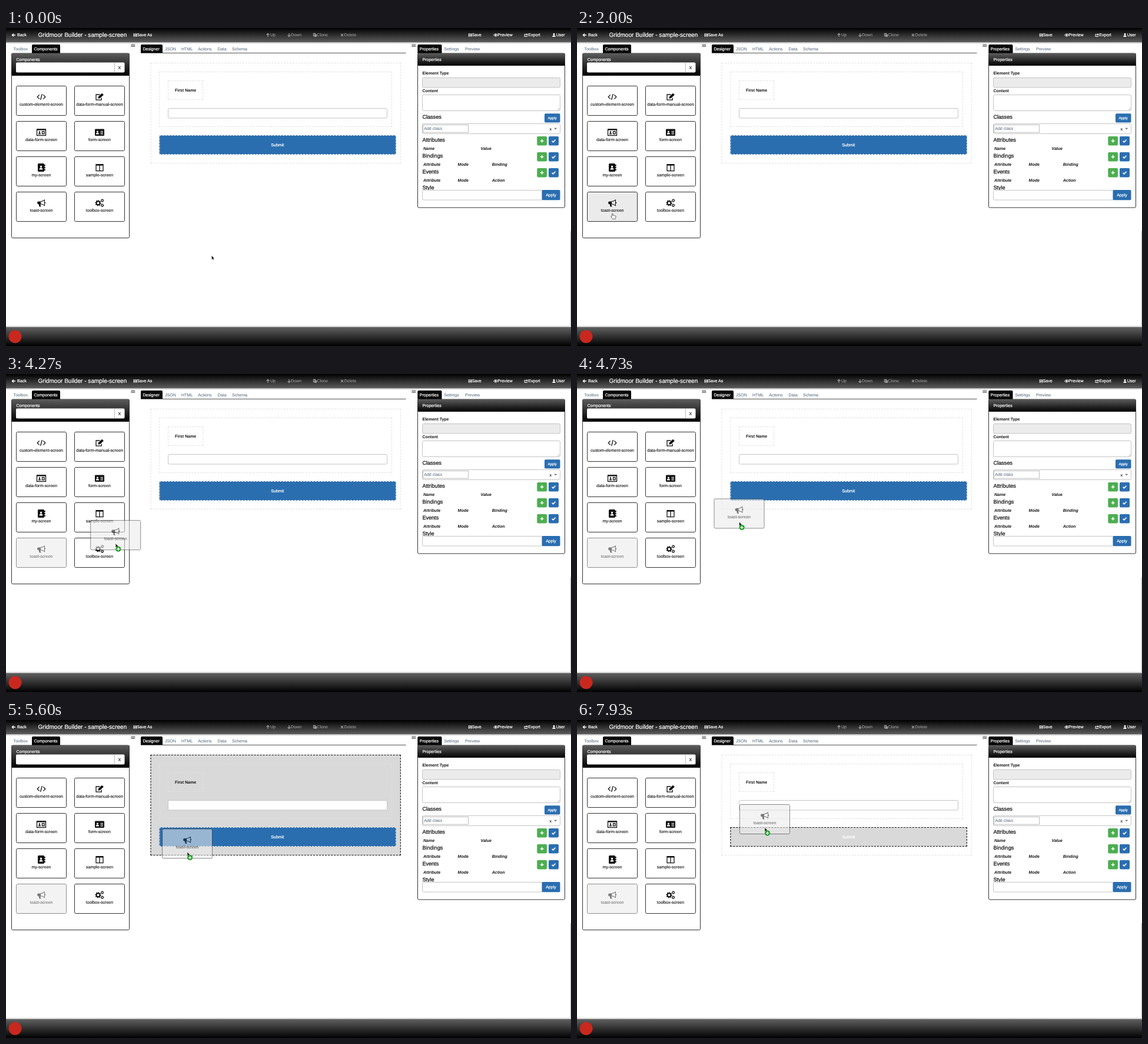
An HTML page for the animation above (8000 ms loop, 960 by 540 pixels).

```html
<!DOCTYPE html>
<html lang="en">
<head>
<meta charset="utf-8">
<title>Screen designer</title>
<style>
  html, body { margin: 0; width: 100%; height: 100%; overflow: hidden; background: #fff; }
  svg { display: block; width: 100%; height: 100%; }
  text { font: 7.1px "Liberation Sans", Arial, sans-serif; text-rendering: geometricPrecision; fill: #111; stroke: #111; stroke-width: .12; }
  .white { fill: #fff; stroke: #fff; stroke-width: .22; }
  .grey { fill: #999; stroke: #999; }
  .tab { fill: #4a6076; stroke: none; }
  .bold { font-weight: bold; font-size: 7px; stroke: none; }
  .col { font-weight: bold; font-style: italic; font-size: 7px; stroke: none; }
  .head { font-size: 9.1px; stroke-width: .25; }
  .title { font-size: 10.05px; }
  .mid { text-anchor: middle; }
  .dashed { fill: none; stroke: #e0e0e0; }
  .dashed rect { stroke: none; }
  .over { fill: #d9d9d9; stroke: #000; }
  .card { fill: #fff; stroke: #333; }
  .hover .card { fill: #ebebeb; }
  .line { fill: none; stroke: currentColor; stroke-width: 1.3; }
  .cut { fill: #fff; }
</style>
</head>
<body>
<svg id="stage" viewBox="0 0 960 540"></svg>
<script>
const BLUE = '#2a6eb0', GREEN = '#4cae4f';

const text = (x, y, s, cls = '') => `<text x="${x}" y="${y}" class="${cls}">${s}</text>`;
const box = (x, y, x2, y2, attrs = '') =>
  `<rect x="${x}" y="${y}" width="${x2 - x}" height="${y2 - y}" ${attrs}/>`;
const field = (x, y, x2, y2, fill = '#fff') => box(x, y, x2, y2, `rx="2" fill="${fill}" stroke="#c4c4c4"`);
const at = (x, y, content, color = '#111') =>
  `<g transform="translate(${x} ${y})" color="${color}" fill="${color}">${content}</g>`;
const path = (d, attrs = '') => `<path d="${d}" ${attrs}/>`;
const gradient = (id, from, to) => `<linearGradient id="${id}" x2="0" y2="1">
  <stop stop-color="${from}"/><stop offset="1" stop-color="${to}"/></linearGradient>`;

// CSS-like dashed border: every side starts and ends with a whole dash
function dashed(x, y, x2, y2, id = '') {
  const dash = 3, gap = 2;
  const side = (d, length) => {
    const count = Math.round((length + gap) / (dash + gap));
    return path(d, `stroke-dasharray="${dash} ${(length - count * dash) / (count - 1)}"`);
  };
  const w = x2 - x, h = y2 - y;
  return `<g id="${id}" class="dashed">` + box(x, y, x2, y2) +
    side(`M${x} ${y + .5}h${w}`, w) + side(`M${x} ${y2 - .5}h${w}`, w) +
    side(`M${x + .5} ${y}v${h}`, h) + side(`M${x2 - .5} ${y}v${h}`, h) + '</g>';
}

const person = 'M-1.5-1.6a1.5 1.6 0 1 0 3 0a1.5 1.6 0 1 0-3 0M-2.6 3Q-2.6.2 0 .2T2.6 3Z';
const gear = (x, y, r) => `<g transform="translate(${x} ${y})" fill="none" stroke="currentColor">
  <circle r="${r}" stroke-width="${r * .65}"/>
  <circle r="${r * 1.45}" stroke-width="${r * .5}" pathLength="16" stroke-dasharray="1"/></g>`;

const icons = {
  code: path('M-3.4-3.6L-6.8 0L-3.4 3.6M3.4-3.6L6.8 0L3.4 3.6M1.4-5L-1.4 5', 'class="line"'),
  edit: path('M3.2 1.5V5.2H-6V-4H.5', 'class="line"') + path('M-2.6 2.7L-2-.4L4-6.3L6.9-3.6L.7 2.3Z'),
  form: box(-7.5, -5, 7.5, 5.5, 'class="line"') + box(-7.5, -5.5, 7.5, -3.4) +
    at(-3, 1, path(person, 'transform="scale(.85)"')) + box(1.5, -1.3, 5, 2.8, 'class="line"'),
  card: box(-8, -5.5, 8, 6, 'rx="1.2"') +
    path(person, 'class="cut" transform="translate(-3.6 .6)"') +
    path('M1.5-2h4.5v1H1.5ZM1.5.3h4.5v1H1.5ZM1.5 2.6h4.5v1H1.5Z', 'class="cut"'),
  book: box(-6, -7, 5, 7, 'rx="1.5"') + path('M5-5h1.7v2.6H5ZM5-1.3h1.7v2.6H5ZM5 2.4h1.7V5H5Z') +
    path(person, 'class="cut" transform="translate(-.5 .2) scale(1.1)"'),
  columns: path('M-6-5.4H6V5.6H-6ZM0-5V5', 'class="line"') + box(-6, -6, 6, -3.4),
  horn: path('M6-6Q2-2.8-2-2.6H-5Q-6.8-2.6-6.8-1V.6Q-6.8 2.2-5 2.2H-4.2Q-4.3 5-3 6.5H-.5Q-2 4.5-1.2 2.3Q2.6 2.6 6 5.4V1Q7.3.6 7.3-.4T6-1.6ZM5-4V3.5Q2 1.5-1 1.3V-1.7Q2-2 5-4Z', 'fill-rule="evenodd"'),
  gears: gear(-2.5, .3, 3) + gear(4.6, -4, 1.7) + gear(4.6, 4.2, 1.7),
  left: path('M3 0H-2.5M0-2.6L-2.6 0L0 2.6', 'class="line"'),
  up: path('M0 3V-2.5M-2.3-.2L0-2.6L2.3-.2', 'class="line"'),
  down: path('M0-3V2.5M-2.3.2L0 2.6L2.3.2', 'class="line"'),
  cross: path('M-2-2L2 2M2-2L-2 2', 'class="line"'),
  clone: path('M-2.5-2.5H.5V1.5H-2.5Z', 'class="line"') + box(-.8, -1.2, 3, 3),
  disk: path('M-2.6-2.8H1.8L2.7-1.9V2.8H-2.6ZM-1.4-2.2V-.6H1.2V-2.2ZM-1.4.7V2.2H1.5V.7Z', 'fill-rule="evenodd"'),
  eye: path('M-3.6 0Q0-4.4 3.6 0Q0 4.4-3.6 0Z', 'class="line" style="stroke-width:.9"') + '<circle r="1.4"/>',
  share: path('M-.8-1.4H-2.5V2.4H2V1', 'class="line" style="stroke-width:1"') +
    path('M-1.2 1Q-1-1.5 1-1.7V-3L3.4-1L1 .8V-.4Q0-.4-1.2 1Z'),
  user: path(person),
};

// Header and footer bars
const action = (icon, ix, x, label, cls = 'white') =>
  at(ix, 12, icons[icon], cls === 'grey' ? '#999' : '#fff') + text(x, 14.4, label, cls);
const bars = box(0, 0, 960, 24, 'fill="url(#top)"') + box(0, 24, 960, 27, 'fill="url(#shade)"') +
  box(0, 508, 960, 540, 'fill="url(#bottom)"') + box(0, 505, 960, 508, 'fill="url(#rise)"') +
  box(959, 345, 960, 506, 'fill="#bbb"') +
  '<circle cx="15.5" cy="524" r="11" fill="#c9281f"/>' +
  action('left', 13, 19, 'Back') + text(54.5, 15.4, 'Gridmoor Builder - sample-screen', 'white title') +
  action('disk', 219.3, 222.3, 'Save As') +
  action('up', 445, 449, 'Up', 'grey') + action('down', 481, 484, 'Down', 'grey') +
  action('clone', 525, 528.3, 'Clone', 'grey') + action('cross', 571, 574.6, 'Delete', 'grey') +
  action('disk', 788.5, 791.5, 'Save') + action('eye', 832, 835.3, 'Preview') +
  action('share', 883.5, 887.3, 'Export') + action('user', 931, 934.7, 'User');

const activeTab = (x, x2, label) =>
  path(`M${x} 43V30q0-2 2-2H${x2 - 2}q2 0 2 2V43Z`, 'fill="#080808"') + text(x + 3.4, 37.5, label, 'white');
const tab = (x, label) => text(x, 37.5, label, 'tab');
const menu = x => path(`M${x} 26.7h7M${x} 29h7M${x} 31.3h7`, 'stroke="#333" stroke-width="1.1"');
const panel = (x, x2, headEnd, end) => box(x, 43, x2, end, 'rx="2" fill="#fff" stroke="#333"') +
  box(x, 43, x2, headEnd, 'fill="url(#panelFill)"');

// Left column
const card = (icon, label) => box(-42.5, -25, 42.5, 25, 'rx="2.2" class="card"') +
  at(0, -6.5, icons[icon]) + text(0, 8.2, label, 'mid');
const cards = [
  ['code', 'custom-element-screen'], ['edit', 'data-form-manual-screen'],
  ['form', 'data-form-screen'], ['card', 'form-screen'],
  ['book', 'my-screen'], ['columns', 'sample-screen'],
  ['horn', 'toast-screen'], ['gears', 'toolbox-screen'],
].map(([icon, label], i) => `<g id="card${i}" transform="translate(${60 + i % 2 * 99} ${123.5 + (i >> 1) * 60})">${card(icon, label)}</g>`);
const left = tab(12.6, 'Toolbox') + activeTab(44, 92, 'Components') + menu(212.3) +
  panel(9.5, 209.5, 81, 356.5) + text(17.4, 56, 'Components', 'white') +
  box(17, 58.5, 201.5, 75.5, 'rx="2" fill="#fff"') + path('M184.5 59V75', 'stroke="#bbb"') +
  text(192.8, 69.6, 'X', 'mid') + cards.join('');

// Designer column
const centre = activeTab(229, 266, 'Designer') + tab(270, 'JSON') + tab(298, 'HTML') +
  tab(326.3, 'Actions') + tab(359.6, 'Data') + tab(384, 'Schema') + menu(689.3) +
  path('M229 42.5H679.5', 'stroke="#555"') +
  dashed(245.5, 59, 670.8, 230, 'outer') +
  dashed(260.4, 74, 656, 168) + dashed(275, 89, 335, 122) +
  text(305, 108.2, 'First Name', 'bold mid') + field(275.5, 136.5, 647.5, 153) +
  dashed(260.4, 182, 662.8, 215, 'submit') + text(461.3, 201, 'Submit', 'white mid');

// Properties column
const button = (x, y, x2, y2, color, content = '') =>
  box(x, y, x2, y2, `rx="1.8" fill="${color}"`) + at((x + x2) / 2, (y + y2) / 2, content, '#fff');
const section = (y, name, columns) => text(707.4, y, name, 'head') +
  button(902.3, y - 8.6, 919, y + 6.8, GREEN, path('M-2.9 0H2.9M0-2.9V2.9', 'class="line" style="stroke-width:1.6"')) +
  button(922, y - 8.6, 939, y + 6.8, BLUE, path('M-2.8.2L-.8 2.2L3-2', 'class="line" style="stroke-width:1.6"')) +
  columns.map(([x, s]) => text(x, y + 13.9, s, 'col')).join('');
const right = activeTab(699.3, 740.5, 'Properties') + tab(744.2, 'Settings') + tab(780, 'Preview') +
  panel(699.5, 949.5, 64, 305) + text(707.4, 56, 'Properties', 'white') +
  text(707.5, 79, 'Element Type', 'bold') + field(707.5, 84.5, 941.5, 101, '#ebebeb') +
  text(707.5, 108.5, 'Content', 'bold') + field(707.5, 113.5, 941.5, 140.5) +
  path('M937 139.5l3.5-3.5M939 139.5l1.5-1.5', 'stroke="#888" stroke-width=".6"') +
  text(707.4, 153.6, 'Classes', 'head') + button(915, 145.3, 941.5, 160.5, BLUE) +
  `<text x="928.2" y="155" class="white mid" style="font-size:6.2px">Apply</text>` +
  field(707.5, 162.5, 941.5, 179.5) + box(708.5, 164.5, 785.5, 177.3, 'fill="#fff" stroke="#bbb"') +
  text(710.2, 173, 'Add class', 'tab') + text(923.4, 174, 'x') +
  path('M931 169.7H936.4L933.7 172.6Z', 'fill="#777"') +
  section(192.6, 'Attributes', [[709, 'Name'], [806.5, 'Value']]) +
  section(219.6, 'Bindings', [[709, 'Attribute'], [767.6, 'Mode'], [825.8, 'Binding']]) +
  section(246.6, 'Events', [[709, 'Attribute'], [767.6, 'Mode'], [825.8, 'Action']]) +
  text(707.4, 273.6, 'Style', 'head') + field(707.5, 275.5, 912, 292) +
  button(910.5, 275, 941.5, 292.3, BLUE) + text(926, 286.2, 'Apply', 'white mid');

const pointer = path('M0 0V7.2L1.6 5.7L2.7 8.2L3.9 7.7L2.9 5.3H5Z', 'fill="#111" stroke="#fff" stroke-width=".5" id="arrow"') +
  path('M-.7 0Q.3-1.2 1.2 0V3Q2.4 2 3.2 3.1Q4.3 2.4 4.9 3.5Q6.2 3.2 6 4.5Q6 7 5 8.8H.4Q-1 6.7-2.3 5Q-2.4 3.7-.7 4.6Z', 'fill="#fff" stroke="#444" stroke-width=".8" id="hand"') +
  `<g id="badge" transform="translate(4.6 9.6)"><circle r="4.6" fill="#22a02c"/>${path('M-2.7 0H2.7M0-2.7V2.7', 'stroke="#fff" stroke-width="1.4"')}</g>`;

const byId = id => document.getElementById(id);
byId('stage').innerHTML = `<defs>${gradient('top', '#000', '#5c5c5c')}${gradient('bottom', '#606060', '#000')}
  ${gradient('panelFill', '#5c5c5c', '#000')}
  ${gradient('shade', '#aaa', '#fff')}${gradient('rise', '#fff', '#bbb')}</defs>` +
  left + centre + right + bars +
  `<g id="ghost" class="hover" opacity=".57">${card('horn', 'toast-screen')}</g><g id="pointer">${pointer}</g>`;

// Pointer path: time, x, y
const stops = [
  [400, 349.3, 386.3], [867, 220, 413], [1267, 98, 372], [2000, 60, 315.5], [3533, 60, 316],
  [3800, 89, 316], [4400, 214.5, 277], [4733, 275.5, 251], [5267, 298.5, 230.5], [5600, 308, 224],
  [5733, 308.8, 222.8], [6067, 308.8, 222.8], [6200, 309.3, 221.3], [7400, 309.3, 221.3],
  [7467, 309.6, 220.6], [7933, 319, 182.5],
];

// Monotone cubic interpolation along one axis
function track(t, axis) {
  const slope = i => stops[i] && stops[i + 1]
    ? (stops[i + 1][axis] - stops[i][axis]) / (stops[i + 1][0] - stops[i][0]) : 0;
  const tangent = i => {
    const a = slope(i - 1), b = slope(i);
    return a * b > 0 ? 2 * a * b / (a + b) : 0;
  };
  if (t <= stops[0][0]) return stops[0][axis];
  const i = stops.findIndex(s => s[0] >= t) - 1;
  if (i < 0) return stops.at(-1)[axis];
  const span = stops[i + 1][0] - stops[i][0], u = (t - stops[i][0]) / span, v = 1 - u;
  return stops[i][axis] * v * v * (1 + 2 * u) + stops[i + 1][axis] * u * u * (3 - 2 * u) +
    span * u * v * (tangent(i) * v - tangent(i + 1) * u);
}

const show = (id, on) => byId(id).setAttribute('display', on ? 'inline' : 'none');
const place = (id, x, y) => byId(id).setAttribute('transform', `translate(${x} ${y})`);
const STEP = 1000 / 15;

function draw(now) {
  const t = Math.floor((now % 8000 + 5) / STEP) % 120 * STEP;
  const x = track(t, 1), y = track(t, 2);
  const dragging = t > 3590;
  const onCard = dragging || (x < 102 && y < 328);
  const onSubmit = t > 7450 && y < 214.5;
  const onOuter = t > 5320 && !onSubmit;

  place('pointer', x, y);
  place('ghost', x, y - 14);
  show('ghost', dragging);
  show('badge', dragging);
  show('hand', onCard && !dragging);
  show('arrow', !onCard || dragging);

  const source = byId('card6');
  source.setAttribute('class', onCard ? 'hover' : '');
  source.setAttribute('opacity', dragging ? .55 : 1);
  byId('outer').setAttribute('class', onOuter ? 'dashed over' : 'dashed');
  byId('submit').setAttribute('class', onSubmit ? 'dashed over' : 'dashed');
  byId('submit').style.fill = onSubmit ? '' : BLUE;
  requestAnimationFrame(() => draw(performance.now()));
}
draw(0);
</script>
</body>
</html>
```
